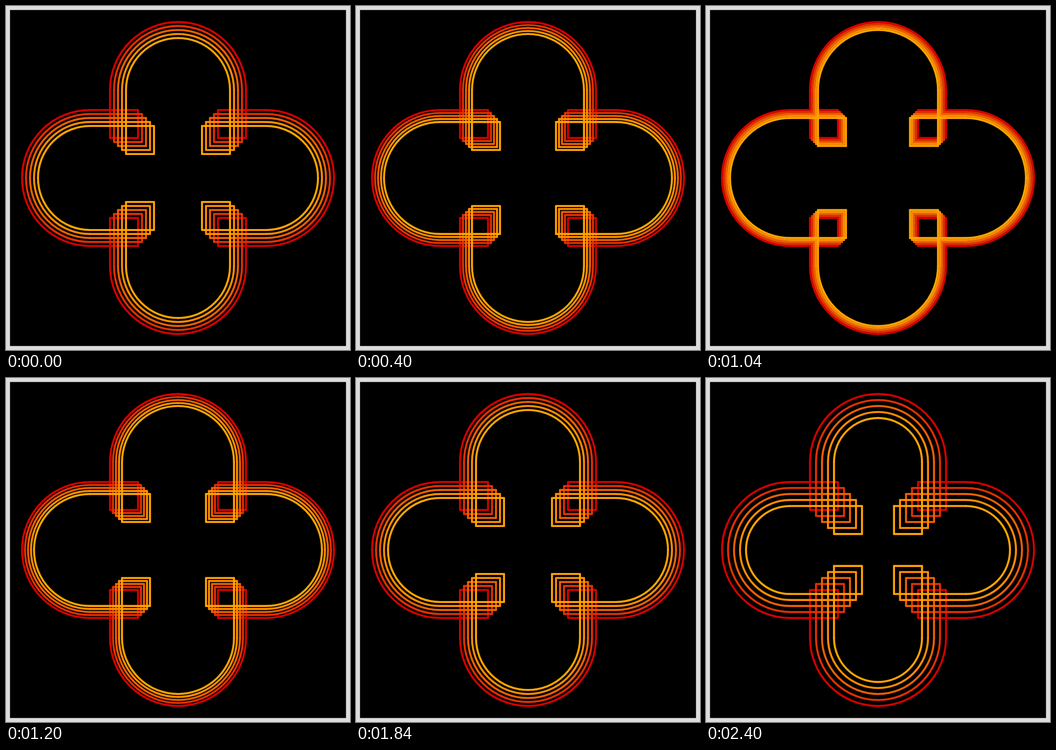
Write an HTML page with a canvas that moves like this. It is 748 by 748 pixels and loops after 2800 ms.

```html
<!DOCTYPE html>
<html lang="en">
<head>
<meta charset="utf-8">
<title>Knot of rings</title>
<style>
  html, body { margin: 0; width: 100%; height: 100%; overflow: hidden; background: #dcdcdc; }
  canvas { display: block; width: 748px; height: 748px; }
</style>
</head>
<body>
<canvas id="stage" width="748" height="748"></canvas>
<script>
const ctx = document.getElementById('stage').getContext('2d');

const SIZE = 748;
const UNITS = 344;              // stage width in drawing units
const BORDER = 4;
const RADIUS = 68;              // outermost ring
const ARM = 88;                 // centre of the stage to centre of a lobe
const LOOP = 28;                // side of the corner squares
const STEP_MS = 400;
const GAPS = [4, 3, 2, 3, 4, 5, 6];
const COLORS = ['#d40000', '#e33000', '#ee6000', '#ff8c00', '#ffa500'];

function line(x1, y1, x2, y2) {
  ctx.beginPath();
  ctx.moveTo(x1, y1);
  ctx.lineTo(x2, y2);
  ctx.stroke();
}

function quarterArc(x, y, r) {
  ctx.beginPath();
  ctx.arc(x, y, r, 0, Math.PI / 2);
  ctx.stroke();
}

// One quadrant of a ring: two quarter arcs joined by the corner square.
function quadrant(r) {
  const inner = r - LOOP;
  quarterArc(ARM, 0, r);
  line(ARM, r, inner, r);
  line(inner, r, inner, inner);
  line(inner, inner, r, inner);
  line(r, inner, r, ARM);
  quarterArc(0, ARM, r);
}

function ring(r, color) {
  ctx.strokeStyle = color;
  for (const sx of [-1, 1]) {
    for (const sy of [-1, 1]) {
      ctx.save();
      ctx.scale(sx, sy);
      quadrant(r);
      ctx.restore();
    }
  }
}

function draw(gap) {
  const scale = SIZE / UNITS;
  const half = UNITS / 2 - BORDER;
  ctx.setTransform(1, 0, 0, 1, 0, 0);
  ctx.fillStyle = '#dcdcdc';
  ctx.fillRect(0, 0, SIZE, SIZE);
  ctx.setTransform(scale, 0, 0, scale, SIZE / 2, SIZE / 2);
  ctx.fillStyle = '#000';
  ctx.fillRect(-half, -half, 2 * half, 2 * half);
  ctx.lineWidth = 2;
  ctx.lineCap = 'round';
  COLORS.forEach((color, i) => ring(RADIUS - i * gap, color));
}

function tick() {
  const step = Math.floor(performance.now() / STEP_MS) % GAPS.length;
  draw(GAPS[step]);
  requestAnimationFrame(tick);
}

tick();
</script>
</body>
</html>
```
